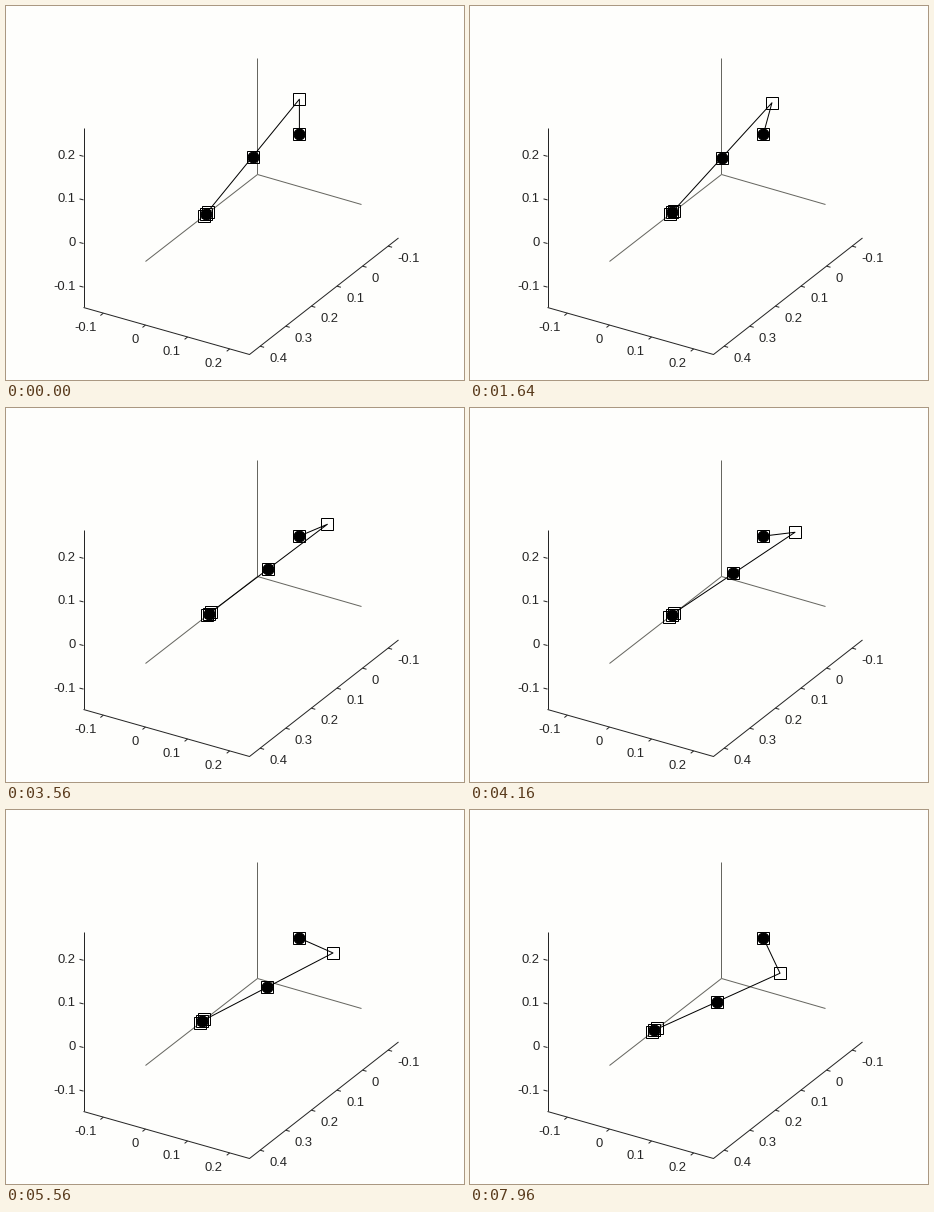
Recreate the animation shown at these times as a matplotlib script. Size 458 px wide and 374 px high, loop 8000 ms.

```python
import numpy as np
import matplotlib.pyplot as plt
from matplotlib.animation import FuncAnimation

W, H, DPI = 458, 374, 100
STEP_MS, FRAMES = 40, 200
PX = 72 / DPI                      # points per pixel

INK = "#262626"
TRIAD = "#666660"
PAPER = "#fefefc"

# oblique projection of the mechanism space, pixels per unit
ORIGIN = np.array([250.4, 167.8])
BASIS = np.array([[-255.5, 199.0], [425.0, 121.0], [0.0, -436.0]])

PIVOT = np.array([0, 0.1, 0.12])
CRANK, ROD, HALF_SLIDER = 0.08, 0.3, 0.009
SPEED, RAMP = 0.378, 2.0           # rad/s, start-up seconds

fig = plt.figure(figsize=(W / DPI, H / DPI), dpi=DPI, facecolor=PAPER)
ax = fig.add_axes([0, 0, 1, 1])
ax.set_xlim(-0.5, W - 0.5)
ax.set_ylim(H - 0.5, -0.5)
ax.axis("off")


def project(points):
    return ORIGIN + np.asarray(points) @ BASIS


def line(points, color=INK, width=1.0):
    x, y = zip(*points)
    return ax.plot(x, y, color=color, lw=width * PX, solid_capstyle="butt")[0]


def label(x, y, value, align):
    ax.text(x, y, f"{value:g}", ha=align, va="center_baseline", color=INK,
            family="Liberation Sans", size=13 * PX)


def draw_axes():
    left, corner, right = (77, 301), (243, 348), (392, 231.5)
    line([(77, 122), left])
    line([left, corner, right])
    for end in [(139, 255), (355, 198)]:
        line([(251, 168), end], TRIAD)
    line([(250, 168), (250, 52)], TRIAD)
    for v in (-0.1, 0, 0.1, 0.2):
        y = 237 - 436 * v
        line([(77, y), (73, y - 1)])
        label(69, y - 2, v, "right")
        x = 139 + 421 * v
        y = np.interp(x, *zip(left, corner))
        line([(x, y), (x - 3, y + 2.4)])
        label(x - 7, y + 13.3, v, "right")
    for v in (-0.1, 0, 0.1, 0.2, 0.3, 0.4):
        x = 356 - 256 * v
        y = np.interp(x, *zip(corner, right))
        line([(x, y), (x + 4, y + 1.1)])
        label(x + 9.2, y + 10.9, v, "left")


def crank_angle(t):
    if t < RAMP:
        return SPEED * t * t / (2 * RAMP)
    return SPEED * (t - RAMP / 2)


def pose(t):
    a = crank_angle(t)
    pin = PIVOT + CRANK * np.array([0, np.sin(a), np.cos(a)])
    slide = np.array([np.sqrt(ROD**2 - pin[1]**2 - pin[2]**2), 0, 0])
    half = np.array([HALF_SLIDER, 0, 0])
    links = project([PIVOT, pin, slide])
    masses = project([PIVOT, (pin + slide) / 2, slide])
    joints = project([pin, slide - half, slide + half])
    return links, masses, np.vstack([masses, joints])


draw_axes()
links, = ax.plot([], [], color="black", lw=1 * PX, zorder=3)
squares, = ax.plot([], [], "s", ms=12 * PX, mfc="none", mec="black",
                   mew=1 * PX, zorder=4)
dots, = ax.plot([], [], "o", ms=11 * PX, mfc="black", mec="black",
                mew=1 * PX, zorder=5)


def draw(i):
    for artist, pts in zip((links, dots, squares), pose(i * STEP_MS / 1000)):
        artist.set_data(pts[:, 0], pts[:, 1])
    return links, dots, squares


anim = FuncAnimation(fig, draw, frames=FRAMES, interval=STEP_MS,
                     repeat=True, repeat_delay=0, blit=False)
plt.show()
```
